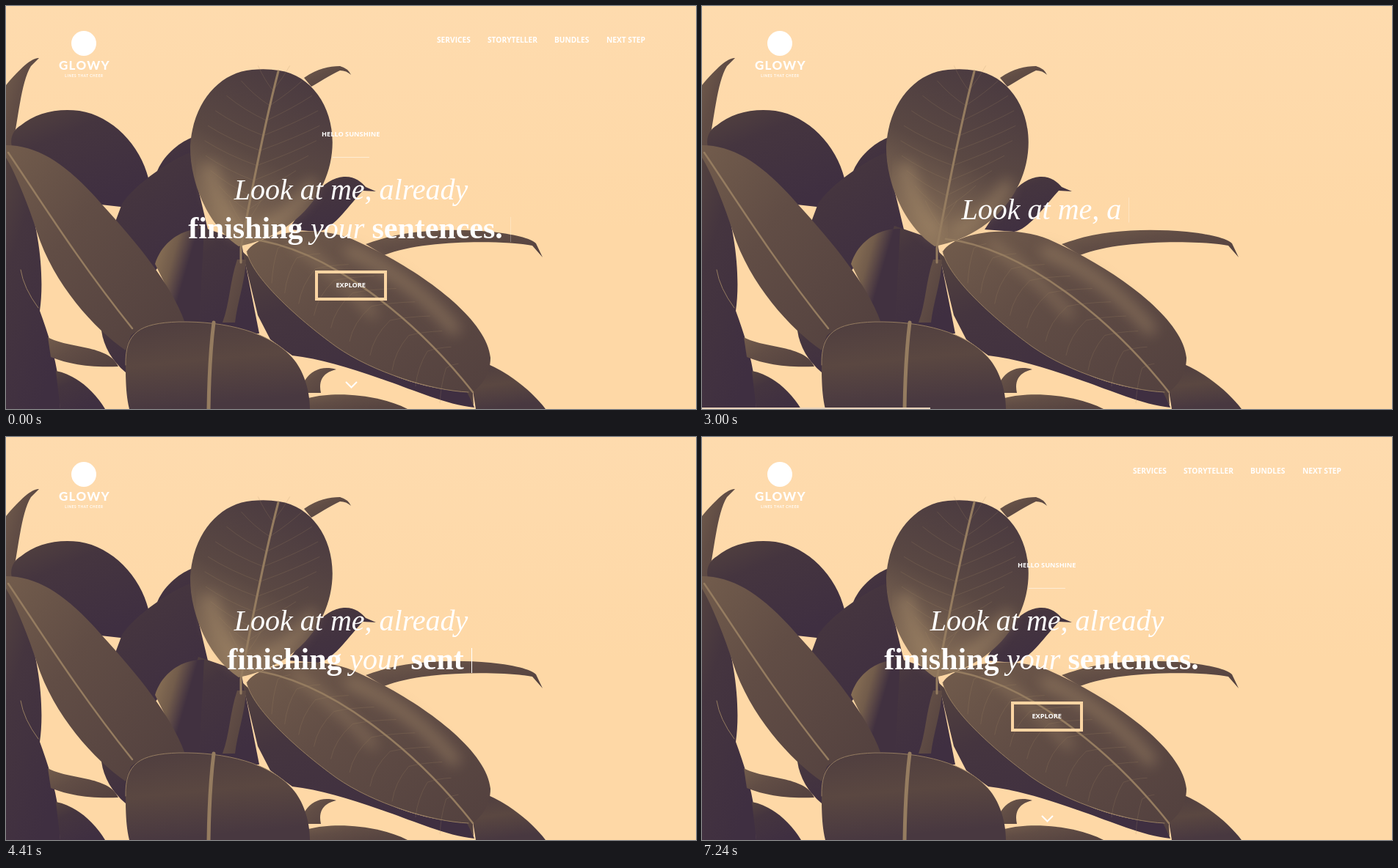
Write an HTML page that moves like this. It is 940 px wide and 550 px high and loops after 8240 ms.

```html
<!DOCTYPE html>
<html lang="en">
<head>
<meta charset="utf-8">
<title>Words typed over leaves</title>
<style>
  html, body { margin: 0; width: 100%; height: 100%; overflow: hidden; background: #fed8a6; }
  svg { position: absolute; left: 0; top: 0; }
  svg text { font: 700 9.2px "Open Sans", sans-serif; fill: #fff; }
  #nav text { font-size: 10.2px; }
  .mid { text-anchor: middle; }
  svg .brand { font: 800 17px Lato, sans-serif; letter-spacing: 1.3px; }
  svg .tagline { font: 700 4.6px Lato, sans-serif; letter-spacing: .7px; }
  .rib { fill: none; stroke: #957c60; stroke-linecap: round; }
  .vein { fill: none; stroke: #a38867; opacity: .22; }
  .sheen { fill: none; stroke: #b1946f; stroke-linecap: round; opacity: .4; filter: url(#blur); }
  h1 {
    position: absolute; left: 0; top: 276.5px; width: 940px; margin: 0;
    transform: translateY(-50%); text-align: center; color: #fff;
    font: 400 40px/53px "Liberation Serif", serif;
  }
  h1 b { font-size: 42px; }
  #cursor {
    display: inline-block; width: 4px; height: 34px; margin-left: 10px;
    vertical-align: -5px; border-left: 1.4px solid #fff;
  }
</style>
</head>
<body>
<svg width="940" height="550" viewBox="0 0 940 550">
  <defs>
    <filter id="blur" x="-50%" y="-50%" width="200%" height="200%"><feGaussianBlur stdDeviation="9"/></filter>
    <linearGradient id="wall" x2="0" y2="1">
      <stop stop-color="#fedbae"/><stop offset=".55" stop-color="#fed8a6"/>
    </linearGradient>
    <linearGradient id="dark" x2=".6" y2="1">
      <stop stop-color="#54433f"/><stop offset=".35" stop-color="#45353f"/><stop offset="1" stop-color="#3f2f41"/>
    </linearGradient>
    <linearGradient id="top" x1=".7" x2=".3" y2="1">
      <stop stop-color="#4a3a40"/><stop offset=".5" stop-color="#5a4843"/><stop offset="1" stop-color="#8f765c"/>
    </linearGradient>
    <linearGradient id="side" x2="1" y2=".9">
      <stop stop-color="#725c4c"/><stop offset=".4" stop-color="#614d45"/><stop offset="1" stop-color="#53413f"/>
    </linearGradient>
    <linearGradient id="front" x2=".2" y2="1">
      <stop stop-color="#4f3e3f"/><stop offset=".5" stop-color="#5a4741"/><stop offset="1" stop-color="#483840"/>
    </linearGradient>
    <linearGradient id="glow" x2=".9" y2=".5">
      <stop stop-color="#927859"/><stop offset=".45" stop-color="#725c4b"/><stop offset=".75" stop-color="#413140"/>
    </linearGradient>
  </defs>

  <rect width="940" height="550" fill="url(#wall)"/>
  <g id="plant"></g>

  <circle cx="106" cy="51" r="17" fill="#fff"/>
  <text class="brand mid" x="107" y="87">GLOWY</text>
  <text class="tagline mid" x="106.5" y="97">LINES THAT CHEER</text>

  <g id="nav">
    <text x="587" y="50">SERVICES</text>
    <text x="656" y="50">STORYTELLER</text>
    <text x="747" y="50">BUNDLES</text>
    <text x="818" y="50">NEXT STEP</text>
  </g>
  <g id="intro">
    <text class="mid" x="469.7" y="178">HELLO SUNSHINE</text>
    <path d="M445 206.5H495" stroke="#fff" opacity=".5"/>
  </g>
  <g id="button">
    <rect x="423" y="363" width="94" height="37" fill="none" stroke="#fbd5a3" stroke-width="4"/>
    <text class="mid" x="469.7" y="384">EXPLORE</text>
  </g>
  <path id="arrow" d="M463 517L470.5 524.5L478 517" fill="none" stroke="#fff" stroke-width="2"/>
  <rect id="bar" y="548" width="311" height="2" fill="#e9d3bb"/>
</svg>
<h1><span id="typed"></span><span id="cursor"></span></h1>

<script>
const LOOP = 8240;
const $ = id => document.getElementById(id);

// Leaves from back to front: fill, outline
const leaves = [
  ["side", "M45 71C36 70 20 84 0 108V195H8C17 155 20 105 34 82Z"],
  ["dark", "M8 192C4 177 14 166 20 163C40 146 70 139 100 143C145 150 183 190 194 235L165 275L120 270Z"],
  ["dark", "M0 195L20 240C45 290 53 370 46 416C62 460 74 500 74 550H0Z"],
  ["dark", "M205 228C213 205 235 187 252 180V215Z"],
  ["dark", "M145 305L158 270C172 248 215 215 250 200L275 305L240 312L203 362Z"],
  ["dark", "M262 300L320 320L345 447H240L230 390Z"],
  ["glow", "M203 352C212 322 240 303 270 304L263 432H243Z"],
  ["side", "M57 452C85 468 140 462 153 492C110 494 80 487 61 479Z"],
  ["dark", "M68 498C95 503 120 525 135 550H74Z"],
  ["dark", "M130 443L240 420V480L163 500C145 485 133 465 130 443Z"],
  ["side", "M0 190C45 190 85 218 130 270C180 325 225 380 243 430C215 431 185 436 170 450L163 470C120 440 65 380 42 308C30 270 10 222 0 207Z"],
  ["side", "M406 98C425 85 440 82 455 82Q466 85 470 94Q464 88 455 88C440 95 425 105 416 110Z"],
  ["dark", "M385 305C405 275 430 235 460 233C475 232 484 240 490 247L504 253L486 252C465 275 445 305 425 308Z"],
  ["side", "M490 325C540 306 600 303 660 308C690 311 716 317 722 324L731 343L717 327C680 320 570 318 515 340Z"],
  ["dark", "M322 335L450 455C500 500 560 522 630 527L638 548C600 544 555 524 520 512C470 494 430 482 390 477L360 455L343 422Z"],
  ["front", "M655 488C690 503 720 530 735 550H640L636 525Z"],
  ["side", "M405 515C413 498 430 490 450 496C433 500 425 510 429 528H410Z"],
  ["side", "M412 535C450 525 510 531 547 550H412Z"],
  ["side", "M315 346H327C326 375 315 405 312 432H295C305 405 305 375 315 346Z"],
  ["side", "M328 335C345 308 430 296 480 322C560 358 655 425 660 480C660 505 645 520 636 527L637 545L628 527C580 525 500 500 450 465C395 425 335 370 328 335Z"],
  ["top", "M372 88C420 95 450 145 444 200C437 265 385 315 317 328C275 300 250 240 251 190C255 132 290 91 335 87Q355 85 372 88Z"],
  ["front", "M163 490C162 445 182 433 235 431C300 430 360 445 390 480C408 500 414 530 414 550H168C163 530 163 505 163 490Z"],
];
const ribs = [
  [2.5, "M3 200C50 270 100 350 172 440"],
  [3, "M371 89C355 150 335 250 320 330V350"],
  [2.5, "M332 318C440 330 560 430 636 527"],
  [5, "M283 432Q277 480 276 550"],
  [1, "M20 360Q24 385 44 412"],
  [1, "M328 335C335 370 395 425 450 465C500 500 580 525 630 527"],
  [1, "M163 490C162 445 182 433 235 431C300 430 360 445 390 480"],
];
const sheens = [
  [24, "M278 225Q290 275 316 305"],
  [18, "M350 305Q395 280 415 245"],
  [18, "M470 335Q550 370 610 440"],
  [12, "M395 325Q450 365 500 420"],
  [14, "M250 460V520"],
];

// Paired side veins along the top leaf and the right leaf
const veins = [];
for (let i = 1; i < 11; i++) {
  const u = i / 11, span = Math.sin(Math.PI * u);
  const x = 368 - 48 * u, y = 95 + 225 * u;
  veins.push(`M${x} ${y}q${50 * span} -18 ${82 * span} -34M${x} ${y}q${-40 * span} -14 ${-72 * span} -34`);
  const rx = 345 + 280 * u, ry = 318 + 200 * u * (.65 + .35 * u);
  veins.push(`M${rx} ${ry}q${25 * span} -5 ${60 * span} -6M${rx} ${ry}q${-25 * span} 22 ${-30 * span} 48`);
}

const strokes = (name, list) =>
  list.map(([width, d]) => `<path class="${name}" d="${d}" stroke-width="${width}"/>`).join("");

$("plant").innerHTML =
  leaves.map(([fill, d]) => `<path d="${d}" fill="url(#${fill})"/>`).join("") +
  strokes("sheen", sheens) + strokes("vein", [[1, veins.join("")]]) + strokes("rib", ribs);

const phrase = [["em", "Look at me, already "], ["b", "finishing "], ["em", "your "], ["b", "sentences."]];
const FULL = 45, WRAP_AFTER = 28;

function typedHtml(count) {
  let left = count;
  return phrase.map(([tag, text], i) => {
    const part = text.slice(0, Math.max(0, left));
    left -= text.length;
    const wrap = i === 1 && count > WRAP_AFTER ? "<br>" : "";
    return part && `${wrap}<${tag}>${part}</${tag}>`;
  }).join("");
}

const clamp = v => Math.min(1, Math.max(0, v));
const fade = (t, from, to) => clamp((t - from) / (to - from));
const pulse = (t, zero, period) => (1 - Math.cos(2 * Math.PI * (t - zero) / period)) / 2;

function charsAt(t) {
  if (t < 1880) return FULL;
  const n = t < 3760 ? (t - 2320) / 51 : 28.2 + (t - 3760) / 57;
  return Math.min(FULL, Math.max(0, Math.floor(n)));
}

function cursorAt(t) {
  if (t < 1530) return pulse(t, 1350, 740);
  if (t < 1880) return 0;
  if (t < 4750) return pulse(t, 3490, 600);
  return t < 7240 ? pulse(t, 5760, 740) : 0;
}

let shown = -1;
function draw(t) {
  const before = t < 1530;
  const show = (id, from, to) => $(id).style.opacity = before ? 1 : fade(t, from, to);
  show("nav", 4700, 5250);
  show("intro", 5000, 5600);
  show("button", 5400, 5950);
  show("arrow", 6150, 6450);

  const p = before ? fade(t, 0, 880) : fade(t, 6150, 7000);
  const drop = -4 * (1 - p) + 16 * Math.sin(Math.PI * p);
  $("arrow").setAttribute("transform", `translate(0 ${drop})`);
  $("bar").style.opacity = t >= 1180 && t < 4100 ? 1 : 0;

  const count = charsAt(t);
  if (count !== shown) $("typed").innerHTML = typedHtml(shown = count);
  $("cursor").style.opacity = cursorAt(t);
}

function tick() {
  draw(performance.now() % LOOP);
  requestAnimationFrame(tick);
}
tick();
</script>
</body>
</html>
```
